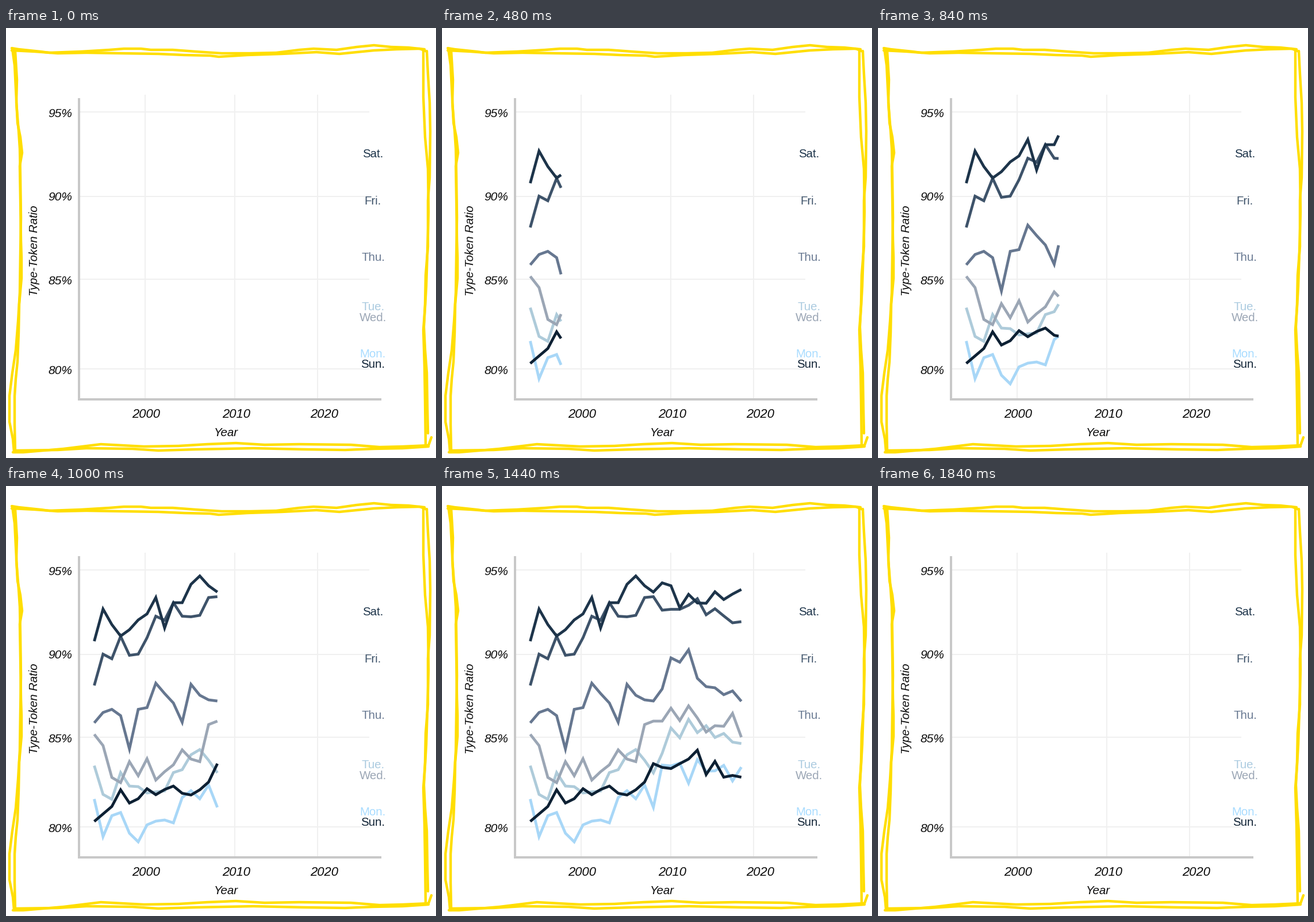
A matplotlib script that plays this animation: 748x748 px, repeating every 2 s.

```python
import numpy as np
import matplotlib.pyplot as plt
from matplotlib.animation import FuncAnimation

SIZE, DPI = 748, 64
FRAMES, STEP = 50, 40          # 2000 ms loop
PT = 72 / DPI                  # points per pixel
X0, DX = 153.5, 15.3           # first year and year spacing
SHOW, CLEAR = 240, 1840        # when the lines appear and vanish, in ms

plt.rcParams["font.family"] = "Liberation Sans"
fig = plt.figure(figsize=(SIZE / DPI, SIZE / DPI), dpi=DPI, facecolor="white")
ax = fig.add_axes([0, 0, 1, 1])
ax.set_xlim(0, SIZE)
ax.set_ylim(SIZE, 0)
ax.axis("off")


def stroke(points, color="#ffde00", width=4.4, cap="round", z=1):
    xs, ys = zip(*points)
    ax.plot(xs, ys, color=color, lw=width * PT, zorder=z,
            solid_capstyle=cap, solid_joinstyle="round")


def label(x, y, text, size, color="#0a0a0a", style="italic", ha="center", angle=0):
    ax.text(x, y, text, fontsize=size * PT, color=color, style=style, ha=ha,
            va="baseline", rotation=angle, rotation_mode="anchor", zorder=6)


# Hand-drawn border: two strokes per side
stroke([(10, 35), (22, 37), (60, 41), (75, 43), (130, 41), (180, 38), (205, 36),
        (235, 36), (252, 38), (290, 38), (330, 41), (375, 44), (425, 44),
        (470, 43), (510, 38), (535, 36), (575, 38), (610, 33), (640, 30),
        (670, 33), (700, 34), (728, 37)])
stroke([(10, 39), (50, 41), (90, 44), (140, 43), (200, 44), (265, 45), (310, 47),
        (355, 48), (370, 50), (420, 47), (480, 45), (540, 42), (580, 45),
        (610, 42), (640, 39), (680, 37), (720, 36), (732, 41)])
stroke([(11, 36), (15, 65), (18, 125), (20, 165), (25, 190), (28, 217), (24, 240),
        (25, 300), (26, 370), (27, 400), (27, 435), (23, 480), (22, 530),
        (20, 580), (17, 610), (15, 640), (15, 690), (16, 738)])
stroke([(16, 40), (19, 90), (18, 130), (22, 180), (24, 210), (25, 260), (26, 330),
        (25, 390), (24, 460), (21, 510), (17, 560), (11, 600), (6, 640),
        (6, 685), (12, 715), (14, 738)])
stroke([(12, 738), (30, 738), (100, 732), (165, 724), (240, 728), (300, 727),
        (350, 724), (400, 722), (450, 725), (510, 724), (600, 725), (650, 729),
        (690, 728), (735, 726), (740, 712)])
stroke([(14, 735), (90, 734), (140, 731), (220, 732), (265, 735), (330, 733),
        (430, 731), (520, 733), (590, 734), (640, 732), (690, 731), (735, 728)])
stroke([(726, 38), (726, 120), (729, 190), (734, 245), (735, 320), (733, 390),
        (731, 450), (729, 485), (726, 525), (728, 590), (729, 650), (730, 728)])
stroke([(732, 40), (734, 80), (737, 130), (738, 180), (737, 260), (734, 300),
        (734, 380), (730, 430), (729, 480), (727, 520), (729, 560), (732, 600),
        (733, 660), (734, 705)])

# Grid, axes and axis text
for y in (146, 293, 437, 593):
    stroke([(127, y), (632, y)], "#f0f0f0", 2, "butt", 2)
for x in (242.5, 398.5, 542.5):
    stroke([(x, 116), (x, 646)], "#f0f0f0", 2, "butt", 2)
stroke([(127, 122), (127, 648)], "#c8c8c8", 4, "butt", 3)
stroke([(125, 646), (653.5, 646)], "#c8c8c8", 4, "butt", 3)

for text, y in (("95%", 155), ("90%", 300), ("85%", 445.5), ("80%", 602)):
    label(115, y, text, 21, ha="right")
for text, x in (("2000", 244), ("2010", 400.5), ("2020", 554)):
    label(x, 678.5, text, 22)
label(382.5, 709.5, "Year", 20.5)
label(55, 387, "Type-Token Ratio", 20.3, angle=90)

series = []


def add_day(name, baseline, color, ys, text_color=None):
    label(638.5, baseline, name, 20.4, text_color or color, "normal")
    line, = ax.plot([], [], color=color, lw=4.8 * PT, zorder=4,
                    solid_capstyle="butt", solid_joinstyle="miter")
    series.append((line, np.array(ys)))


# Yearly heights in pixels, 1994 onwards
add_day("Mon.", 573, "#a8d7f7", [
    544.5, 610, 573.5, 568, 604, 619, 589.5, 583, 581, 586, 542, 530, 544, 520,
    559, 485.5, 487, 482, 517, 476, 496, 495.5, 486, 513, 489, 571, 533, 508,
    570, 567, 565], "#a8dcff")
add_day("Tue.", 491, "#aecbda", [
    486.5, 536.5, 545, 498.5, 522, 523, 534, 532, 530.5, 498.5, 493.5, 467.5,
    458.5, 477, 499, 465, 421, 438, 406, 429, 417, 437.5, 430.5, 445.5, 448,
    462.5, 513, 479, 471, 478, 484], "#abcbe0")
add_day("Wed.", 510, "#9ba6b5", [
    432, 451.5, 507, 516, 479.5, 504, 474.5, 511.5, 497, 485, 459, 475, 479.5,
    415, 409, 409, 386.5, 408, 382.5, 403.5, 428, 417, 418, 395.5, 437, 436.5,
    450, 459.5, 471, 487, 503])
add_day("Thu.", 405, "#667790", [
    412, 394, 388.5, 399.5, 457.5, 388.5, 385.5, 343, 361, 377.5, 411, 345, 364,
    372, 374, 353, 299, 306.5, 285, 334.5, 349, 351, 363, 356.5, 374.5, 398,
    411.5, 398.5, 441, 420, 400])
add_day("Fri.", 307, "#3e536a", [
    347, 292.5, 300.5, 261.5, 294.5, 292.5, 264, 226.5, 233.5, 203, 226.5, 227.5,
    225, 194, 192.5, 216, 214.5, 214.5, 207.5, 196, 224, 213.5, 226, 238, 236,
    273, 279, 294.5, 319, 308, 300])
add_day("Sat.", 225, "#1d344a", [
    270, 214, 241, 261, 250, 233, 222.5, 194, 247, 203, 203, 171, 156.5, 173.5,
    184.5, 168.5, 173.5, 212, 188.5, 203.5, 204, 184, 197.5, 188, 180, 227.5,
    239.5, 238, 238, 228, 218])
add_day("Sun.", 591, "#0d2033", [
    583.5, 570.5, 557.5, 528.5, 551.5, 544, 526.5, 537, 528, 522, 534.5, 537.5,
    528.5, 515, 483, 489.5, 491.5, 483, 475, 459.5, 502, 479, 506.5, 503.5,
    506.5, 494.5, 505, 564.5, 550, 567, 584])


def years_shown(ms):
    """Years drawn so far, in half-year steps; slower at both ends."""
    pos = np.interp(ms, [200, 480, 640, 760, 1000, 1240, 1320, 1640, 1800],
                    [0, 3.5, 6.5, 8.5, 14, 20, 21.5, 27.5, 30])
    return np.floor(2 * pos + 0.5) / 2


def update(frame):
    ms = frame * STEP
    if SHOW <= ms < CLEAR:
        tip = years_shown(ms)
        years = np.append(np.arange(np.ceil(tip)), tip)
    else:
        years = np.array([])
    for line, ys in series:
        line.set_data(X0 + DX * years, np.interp(years, np.arange(len(ys)), ys))
    return [line for line, _ in series]


anim = FuncAnimation(fig, update, frames=FRAMES, interval=STEP,
                     repeat=True, repeat_delay=0, blit=False)
plt.show()
```
